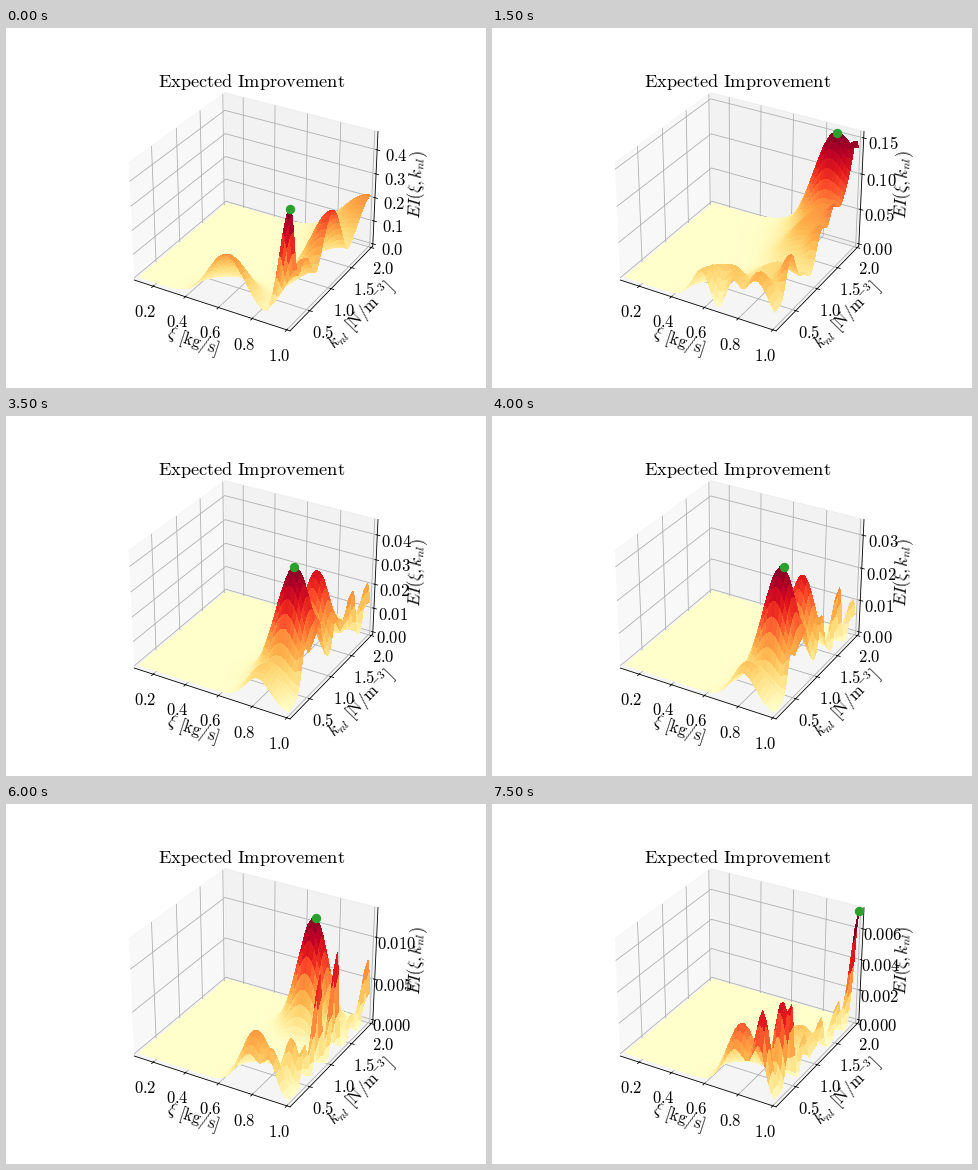
Write a matplotlib script that moves like this. It is 480 by 360 pixels and loops after 8 s.

```python
import numpy as np
import matplotlib.pyplot as plt
from matplotlib.animation import FuncAnimation

plt.rcParams.update({"font.size": 16, "mathtext.fontset": "cm"})

FRAMES, INTERVAL = 16, 500
X_LIM, Y_LIM = (0.1, 1.0), (0.1, 2.0)

# Steps with a known landscape, and the peak value at each
STEPS = (0, 2, 5, 8, 10, 12, 15)
TOPS = (0.465, 0.217, 0.0798, 0.034, 0.0198, 0.0132, 0.0072)

# Highest hill per stage: u, v, spread
PEAKS = ((1, 0, 0.06), (0.632, 0, 0.095), (0.84, 0.95, 0.1), (0.868, 0.297, 0.1),
         (1, 0.103, 0.035), (0.746, 0.748, 0.09), (1, 1, 0.035))

# Lesser hills per stage: u, v, spread, height
HILLS = (
    ((0.6, 0, 0.12, 0.45), (1, 0.5, 0.12, 0.65), (1, 1, 0.18, 0.46)),
    ((0.88, 0.03, 0.08, 0.4), (1, 1, 0.22, 0.76)),
    ((0.85, 0.3, 0.13, 0.54), (0.86, 0.62, 0.12, 0.58), (1, 0.68, 0.06, 0.68)),
    ((0.87, 0.55, 0.08, 0.77), (0.8, 0.05, 0.08, 0.33)),
    ((0.75, 0.74, 0.08, 0.92), (0.85, 0.45, 0.08, 0.4)),
    ((0.92, 0.17, 0.04, 0.4),),
    ((0.9, 0.04, 0.04, 0.7), (0.95, 0.16, 0.04, 0.74), (0.9, 0.48, 0.08, 0.28)),
)

# Ridges along the far x edge: positions, then heights per stage
RIDGE_V = (0.18, 0.345, 0.55, 0.77, 0.96)
RIDGES = ((0.45,), (0.38, 0, 0.38), (0.3, 0.4, 0, 0, 0.62),
          (0.4, 0.4, 0.45, 0.57, 0.33), (0, 0.88, 0.72, 0.8, 0.48),
          (0.36, 0.85, 0.91, 0.22, 0.58), (0.7, 0.34, 0.34, 0.34, 0.36))

U, V = np.meshgrid(np.linspace(0, 1, 50), np.linspace(0, 1, 50))
X = X_LIM[0] + np.ptp(X_LIM) * U
Y = Y_LIM[0] + np.ptp(Y_LIM) * V


def bump(u, v, s, h=1):
    return h * np.exp(-((U - u) ** 2 + (V - v) ** 2) / (2 * s * s))


def landscape(i):
    step = STEPS[i]
    width = 0.03 + 0.07 * np.exp(-step / 3)
    parts = [bump(*PEAKS[i])] + [bump(*hill) for hill in HILLS[i]]
    parts += [bump(1, v, width, h) for v, h in zip(RIDGE_V, RIDGES[i])]
    if step >= 10:
        parts += [bump(0.75, 0.07, 0.08, 0.2 + 0.022 * step),
                  bump(0.87, 0.03, 0.05, 0.38)]
    z = sum(p ** 3 for p in parts) ** (1 / 3)
    return z / z.max()


def improvement(step):
    """Surface at a step; between stages the sampled peak is punched out."""
    i = min(np.searchsorted(STEPS, step, side="right") - 1, len(STEPS) - 2)
    r = (step - STEPS[i]) / (STEPS[i + 1] - STEPS[i])
    z = landscape(i)
    if r > 0:
        k = z.argmax()
        hole = 1 - bump(U.flat[k], V.flat[k], 0.08)
        z = (1 - r) * z * hole + r * landscape(i + 1)
    return z / z.max() * TOPS[i] ** (1 - r) * TOPS[i + 1] ** r


def padded(lo, hi):
    d = (hi - lo) / 48
    return lo - d, hi + d


def tick_step(top):
    raw = top * 25 / 24 / 5
    p = 10 ** np.floor(np.log10(raw))
    step = next(m * p for m in (1, 2, 2.5, 5, 10) if m * p >= raw)
    digits = next(d for d in range(7)
                  if abs(step * 10 ** d - round(step * 10 ** d)) < 1e-6)
    return step, digits


def labels(ticks, digits):
    return [f"${t:.{digits}f}$" for t in ticks]


fig = plt.figure(figsize=(6.4, 4.8), dpi=75)
ax = fig.add_subplot(projection="3d", computed_zorder=False)
ax.set_title(r"$\mathrm{Expected\ Improvement}$", fontsize=17.6, y=1.0)
ax.set_xlabel(r"$\xi\ \mathrm{[kg/s]}$")
ax.set_ylabel(r"$k_{nl}\ \mathrm{[N/m^{-3}]}$")
ax.set_zlabel(r"$EI(\xi, k_{nl})$")
for set_ticks, ticks in ((ax.set_xticks, np.arange(1, 6) * 0.2),
                         (ax.set_yticks, np.arange(1, 5) * 0.5)):
    set_ticks(ticks, labels(ticks, 1))


def draw(step):
    for artist in [*ax.collections, *ax.lines]:
        artist.remove()
    z = improvement(step)
    top, k = z.max(), z.argmax()
    ax.plot_surface(X, Y, z, cmap="YlOrRd", rcount=50, ccount=50,
                    linewidth=0, antialiased=False, zorder=1)
    ax.plot([X.flat[k]], [Y.flat[k]], [top], "o", color="tab:green",
            markersize=8, zorder=10)
    gap, digits = tick_step(top)
    ticks = np.arange(0, top * 49 / 48, gap)
    ax.set_zticks(ticks, labels(ticks, digits))
    ax.set_xlim(padded(*X_LIM))
    ax.set_ylim(padded(*Y_LIM))
    ax.set_zlim(padded(0, top))


anim = FuncAnimation(fig, draw, frames=FRAMES, interval=INTERVAL, repeat=True)
plt.show()
```
